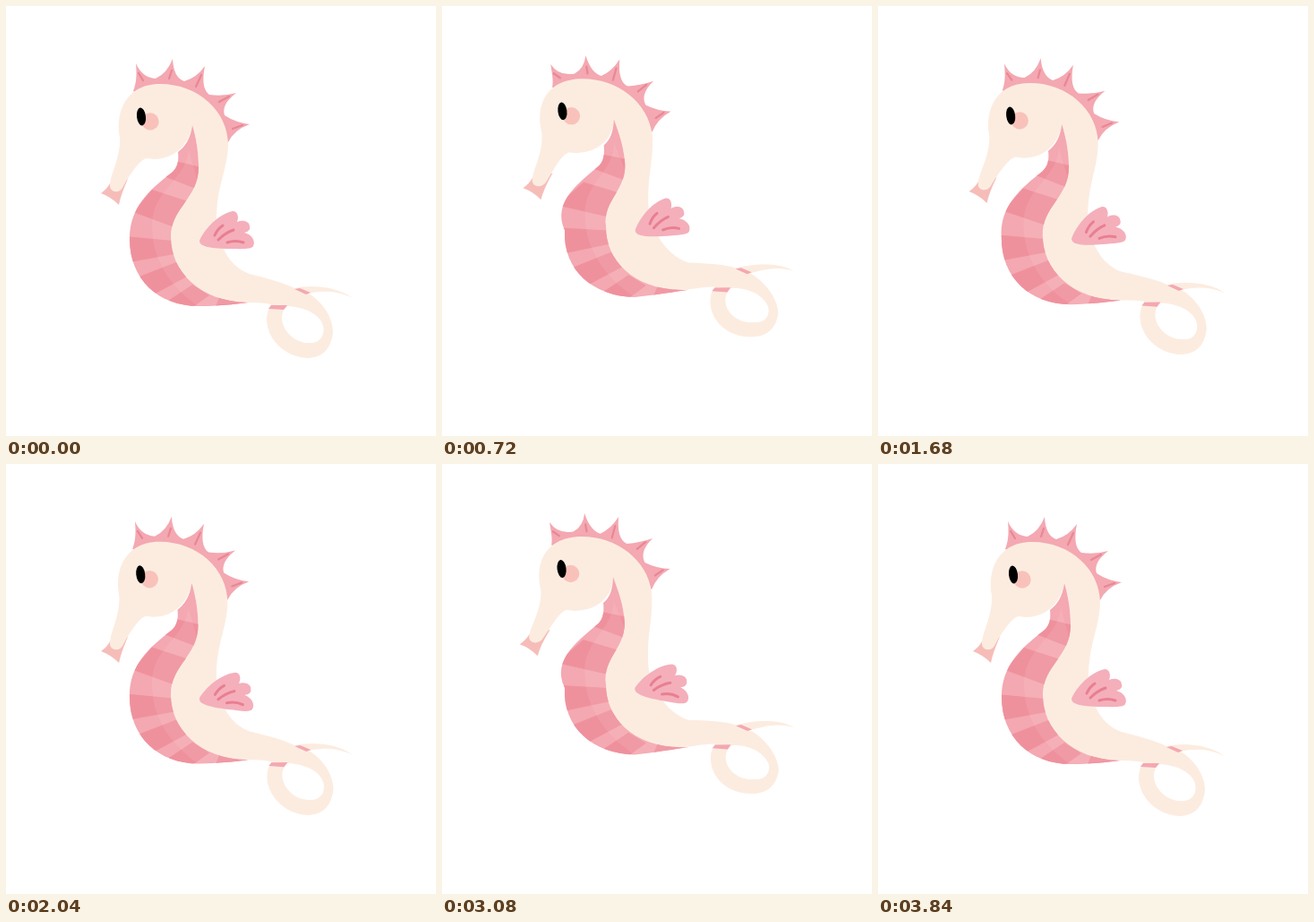
These frames come from a looping animation (480x480 px, 3.88 s). An HTML page with a canvas:

```html
<!DOCTYPE html>
<html lang="en">
<head>
<meta charset="utf-8">
<title>Seahorse</title>
<style>
html, body { margin: 0; width: 100%; height: 100%; overflow: hidden; background: #fff; }
canvas { display: block; }
</style>
</head>
<body>
<canvas id="stage" width="480" height="480"></canvas>
<script>
const ctx = document.getElementById('stage').getContext('2d');
const LOOP = 3880, STEP = 40, SWIM = 1920, FLAP = 960;
const CREAM = '#fcece0', ROSE = '#f4a8b1', BAND = '#ef919d', MARK = '#e88796';

// Pins of the soft body: x, y and how far each one travels in a stroke.
const PINS = [
  [145, 64, -25, 1], [186, 59, -27, -4], [222, 67, -25, -8], [257, 97, -22, -14],
  [272, 132, -17.5, -15], [151, 123, -17.5, -6.5], [208, 133, -17, -7], [126, 130, -17, -6],
  [175, 88, -20, -6], [248, 150, -14, -12], [236, 215, -7, -10], [157, 170, -17, -7],
  [106, 209, -18, -7], [126, 222, -18, -7], [192, 165, -12, -8], [170, 202, -5, -9],
  [138, 260, -1, -10], [210, 334, 0, -10.5], [184, 258, -1, -12], [216, 261, -0.5, -12],
  [262, 295, 3, -13], [265, 332, 6, -15], [330, 319, 6, -24], [303, 336, 9, -20.5],
  [291, 350, 9, -22], [337, 393, 9, -25], [365, 362, 11, -22], [387, 326, 6, -32]
];

const CREST = 'M142,95 C146,85 146,75 145,64 Q152,80 167,81 Q180,75 186,59 Q187,80 199,84 Q213,80 222,67 ' +
  'Q217,92 227,99 Q243,101 257,97 Q240,110 244,122 Q256,130 272,132 Q255,138 248,152 L200,120 Z';
const CREST_MARKS = 'M148,75 L153,83 M185,72 L182,81 M218,77 L212,90 M249,101 L238,107 M264,133 L253,137';
const LIPS = 'M106,209 Q113,204 116,198 L136,193 Q128,211 126,222 Q117,213 106,209 Z';
const SNOUT = 'M127,142 C129,168 117,186 116,199 C115,208 126,210 130,203 C136,192 148,172 157,170 L168,150 Z';
const BODY = 'M128,150 C121,125 130,87 172,87 C215,87 248,118 248,155 C247,185 235,200 235,240 ' +
  'C238,272 252,292 272,299 C292,304 310,309 322,315 C338,311 368,312 387,326 C367,317 350,318 338,321 ' +
  'C354,331 365,348 365,364 C363,384 352,393 336,393 C312,392 291,372 291,350 C291,343 293,338 296,333 ' +
  'C285,331 275,331 265,331 C215,330 184,295 184,258 C184,225 215,215 215,180 C215,160 211,143 208,133 ' +
  'C205,152 190,171 165,171 L157,170 Z ' +
  'M308,348 C308,362 322,377 340,376 C352,376 356,366 354,357 C350,343 332,336 314,335 C310,338 308,343 308,348 Z';
const BELLY = 'M208,133 C206,148 200,157 192,163 C193,172 192,180 185,186 C160,205 138,225 138,260 ' +
  'C138,305 170,335 215,335 C235,335 255,333 270,331 C215,330 184,295 184,258 C184,225 215,215 215,180 ' +
  'C215,160 211,143 208,133 Z';
const BELLY_LIGHT = 'M204,160 C201,195 163,205 163,245 C163,285 185,315 215,335 L270,331 L184,258 L215,200 Z';
const BELLY_BANDS = [
  'M185,172 L218,180 L212,204 L176,190 Z', 'M163,205 L206,219 L188,247 L142,230 Z',
  'M134,257 L186,262 L188,277 L138,286 Z', 'M146,303 L190,286 L202,302 L165,322 Z',
  'M181,329 L208,311 L227,323 L206,338 Z', 'M233,338 L238,325 L275,328 L272,336 Z'
];
const TAIL_BANDS = 'M322,316 L328,315 L340,320 L335,322 Z M296,334 L314,334 L310,339 L293,338 Z';
const FIN = 'M0,1 C6,-13 22,-29 37,-32 C43,-32 44,-25 42,-20 C48,-23 56,-21 56,-15 C57,-11 54,-9 50,-8 ' +
  'C58,-6 63,1 60,7 C58,11 46,10 34,10 C22,10 10,9 6,7 C2,6 0,4 0,1 Z';
const FIN_MARKS = 'M17,-5 Q20,-12 26,-16 M21,0 Q29,-8 38,-11 M31,3 Q40,0 49,3';

let stroke = 0, wag = 0;

function warp(x, y, sway) {
  let sum = 0, dx = 0, dy = 0;
  for (const [px, py, mx, my] of PINS) {
    const w = 1 / (((x - px) ** 2 + (y - py) ** 2) ** 1.5 + 1);
    sum += w;
    dx += w * mx;
    dy += w * my;
  }
  const bend = sway ? wag * Math.min(1, Math.max(0, (y - 150) / 55)) : 0;
  return [x + dx / sum * stroke + bend, y + dy / sum * stroke + bend / 2];
}

const shape = (d, sway) => new Path2D(
  d.replace(/([\d.]+),([\d.]+)/g, (_, x, y) => warp(+x, +y, sway).join()));

function fill(path, color) {
  ctx.fillStyle = color;
  ctx.fill(path, 'evenodd');
}

function line(path, width, color) {
  ctx.strokeStyle = color;
  ctx.lineWidth = width;
  ctx.stroke(path);
}

function oval(x, y, rx, ry, angle, color) {
  const path = new Path2D();
  path.ellipse(...warp(x, y), rx, ry, angle, 0, 7);
  fill(path, color);
}

function drawBelly() {
  const belly = shape(BELLY);
  fill(belly, ROSE);
  ctx.save();
  ctx.clip(belly);
  BELLY_BANDS.forEach(d => fill(shape(d), BAND));
  fill(shape(BELLY_LIGHT), 'rgba(255,255,255,.08)');
  ctx.restore();
}

function drawFin(t) {
  const degrees = 2.6 + 8 * Math.cos((t - 290) / FLAP * 2 * Math.PI);
  ctx.save();
  ctx.translate(...warp(216, 261));
  ctx.rotate(degrees * Math.PI / 180);
  fill(new Path2D(FIN), '#f4afbb');
  line(new Path2D(FIN_MARKS), 3, '#e97f90');
  ctx.restore();
}

function drawFace(t) {
  const blink = Math.max(0, 1 - Math.abs(t - 2440) / 160);
  oval(161, 129, 9.7, 9.7, 0, '#f8c2bb');
  oval(151, 123.5, 5, 10 - 6.4 * blink, -0.12 + 0.25 * blink, '#000');
}

function draw(t) {
  const phase = t / SWIM * 2 * Math.PI;
  stroke = (1 - Math.cos(phase)) / 1.8;
  wag = 2.2 * Math.sin(phase);
  ctx.fillStyle = '#fff';
  ctx.fillRect(0, 0, 480, 480);
  ctx.lineCap = 'round';
  fill(shape(CREST), ROSE);
  line(shape(CREST_MARKS), 2.2, MARK);
  fill(shape(LIPS, true), '#f6bdb8');
  fill(shape(BODY), CREAM);
  fill(shape(SNOUT, true), CREAM);
  drawBelly();
  fill(shape(TAIL_BANDS), ROSE);
  drawFin(t);
  drawFace(t);
}

function tick() {
  draw(Math.floor(performance.now() % LOOP / STEP) * STEP);
  requestAnimationFrame(tick);
}
tick();
</script>
</body>
</html>
```
